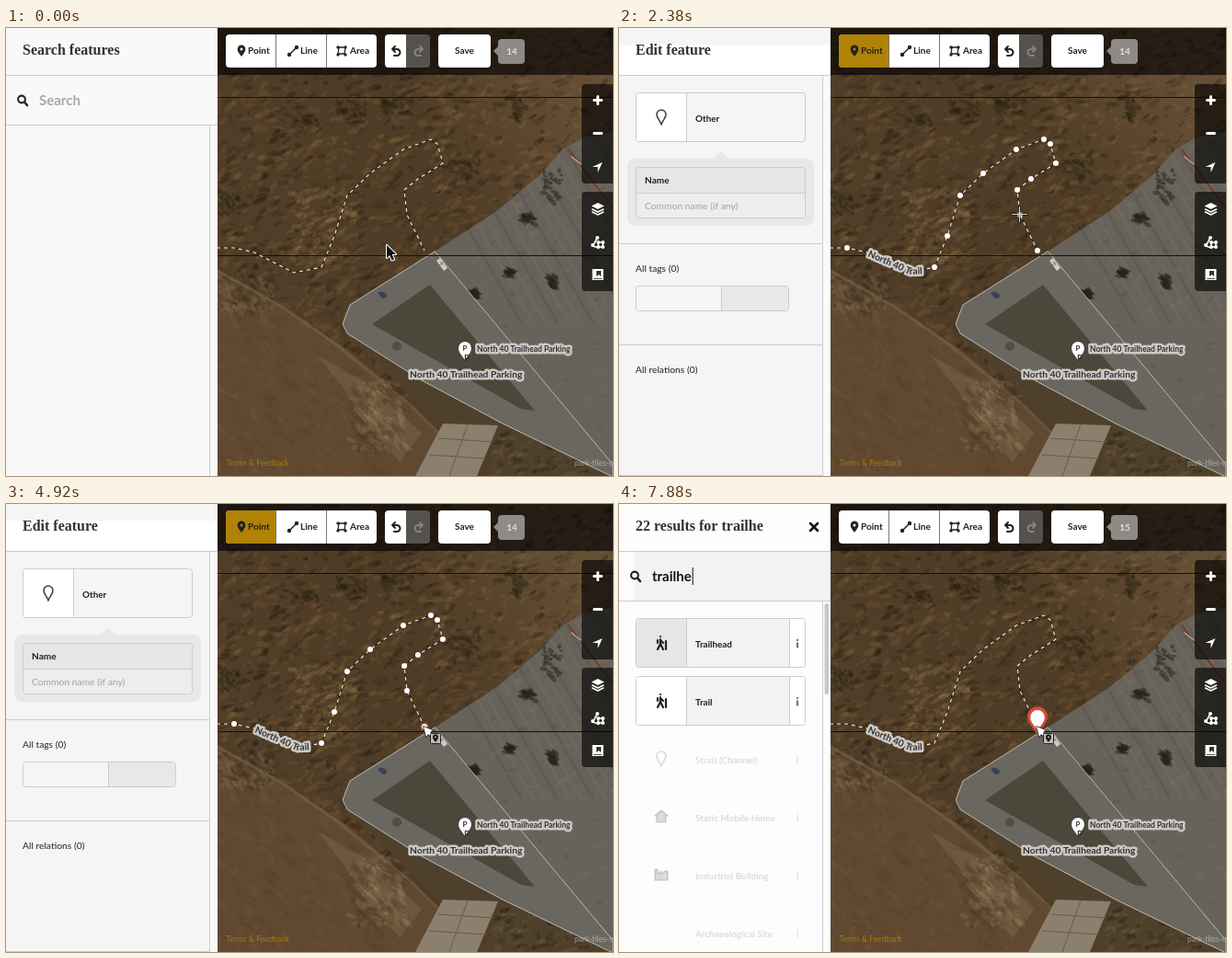
An HTML page with a canvas that plays this animation: 660 by 487 pixels, repeating every 8000 ms.

```html
<!DOCTYPE html>
<html lang="en">
<head>
<meta charset="utf-8">
<title>Map editor: adding a point</title>
<style>
html, body { margin: 0; width: 660px; height: 487px; overflow: hidden; background: #fafafa; }
canvas { display: block; }
</style>
</head>
<body>
<canvas id="stage" width="660" height="487"></canvas>
<script>
const LOOP = 8000, TICK = 148.7;
const stage = document.getElementById('stage').getContext('2d');
let ctx = stage;

// Drawing helpers
const lato = (size, weight = 700) => `${weight} ${size}px Lato, sans-serif`;
const SERIF = 'bold 16px "Liberation Serif", serif';

function text(str, x, y, font = lato(10.1), color = '#222', align = 'left') {
  ctx.font = font;
  ctx.fillStyle = color;
  ctx.textAlign = align;
  ctx.fillText(str, x, y);
}
function rect(x, y, w, h, fill) {
  ctx.fillStyle = fill;
  ctx.fillRect(x, y, w, h);
}
function box(x, y, w, h, r, fill, stroke) {
  ctx.beginPath();
  ctx.roundRect(x, y, w, h, r);
  if (fill) { ctx.fillStyle = fill; ctx.fill(); }
  if (stroke) { ctx.strokeStyle = stroke; ctx.lineWidth = 1; ctx.stroke(); }
}
function shape(d, x, y, { fill, stroke, width = 1, scale = 1, flip = 1 }) {
  const path = new Path2D(d);
  ctx.save();
  ctx.translate(x, y);
  ctx.scale(scale * flip, scale);
  ctx.lineCap = ctx.lineJoin = 'round';
  ctx.lineWidth = width;
  if (stroke) { ctx.strokeStyle = stroke; ctx.stroke(path); }
  if (fill) { ctx.fillStyle = fill; ctx.fill(path); }
  ctx.restore();
}
function dot(x, y, r, fill) {
  ctx.beginPath();
  ctx.arc(x, y, r, 0, 7);
  ctx.fillStyle = fill;
  ctx.fill();
}
function halo(str, x, y, font) {
  ctx.font = font;
  ctx.textAlign = 'left';
  ctx.lineJoin = 'round';
  ctx.lineWidth = 5;
  ctx.strokeStyle = '#cbc9c4';
  ctx.strokeText(str, x, y);
}

const PIN = 'M0 0C-3-5-7-8-7-13A7 7 0 0 1 7-13C7-8 3-5 0 0Z';
const ARROW = 'M0 0V14L3.2 11L5.6 16.5L8 15.5L5.7 10H10Z';
const HAND = 'M-2 8V0A1.6 1.6 0 0 1 1.2 0V5L8 6.5Q10 7 9.5 10L8 16H0L-5 9Q-5 6-2 8Z';
const HIKER = 'M-1-7h.1M-1-4v5l-3 6M-1 1l3 6M-1-3l3 3M5-2v9M-4-3v3';
const ICONS = {
  'Waste Basket': 'M3-7h.1M3-4v11M5-3v4M3-3l-4 2M-7 1l1 6h3l1-6z',
  'Picnic Area': 'M-5-4h10M-7 0h14M-2-4l-4 9M2-4l4 9',
  'Restroom': 'M-5-6h.1M-5-3v9M-3-3v4M-7-3v4M5-6h.1M5-3v9M3 1l1-4h2l1 4M0-6v12',
  'Campground': 'M-6 6L1-6M-1-6L6 6M-7 6h4l3-5l3 5h4',
  'Information': 'M-7 0a7 7 0 1 0 14 0a7 7 0 1 0-14 0',
  'Trailhead': HIKER,
  'Trail': HIKER,
  'Strait (Channel)': 'M0 8C-1 4-5 1-5-3A5 5 0 0 1 5-3C5 1 1 4 0 8Z',
  'Static Mobile Home': 'M-7-1L0-7L7-1H5V6H-5V-1Z',
  'Industrial Building': 'M-7 6V-6H-4V-1L0-4V-1L4-4H7V6Z'
};
const SOLID = ['Static Mobile Home', 'Industrial Building'];
const PRESETS = ['Waste Basket', 'Picnic Area', 'Restroom', 'Campground', 'Parking', 'Information'];
const RESULTS = ['Trailhead', 'Trail', 'Strait (Channel)', 'Static Mobile Home', 'Industrial Building', 'Archaeological Site'];

const TRAIL = [[229, 239], [248, 239], [270, 244], [313, 266], [343, 260], [357, 226], [371, 182],
  [396, 158], [432, 132], [462, 121], [469, 126], [475, 147], [448, 164], [433, 176], [436, 203], [455, 242]];
const trailPath = 'M' + TRAIL.join('L');

// Aerial backdrop in simple tones, painted once
function paintGround() {
  let seed = 40;
  const rnd = () => (seed = seed * 16807 % 2147483647) / 2147483647;
  const speckle = (count, x, y, w, h, size, colors, tilt = -0.9) => {
    for (let i = 0; i < count; i++) {
      ctx.fillStyle = colors[i % colors.length];
      ctx.beginPath();
      ctx.ellipse(x + rnd() * w, y + rnd() * h, 1 + rnd() * size, 1 + rnd() * size / 3, rnd() + tilt, 0, 7);
      ctx.fill();
    }
  };
  const bush = (x, y, w, h, color) => speckle(26, x - w, y - h, 2 * w, 2 * h, 5, [color], 0);

  const base = ctx.createLinearGradient(230, 230, 600, 40);
  base.addColorStop(0, '#513e28');
  base.addColorStop(0.6, '#4f3c26');
  base.addColorStop(1, '#644e34');
  rect(230, 0, 430, 487, base);
  speckle(2200, 230, 0, 430, 400, 7, ['#140e0640', '#a07d4e2c', '#2a1f1238', '#8a6a4230']);
  speckle(150, 310, 175, 70, 80, 6, ['#a07d4e30']);
  [[375, 88, 18, 9], [320, 100, 20, 8], [425, 85, 15, 8], [500, 152, 18, 8], [245, 190, 14, 12], [556, 90, 5, 14]]
    .forEach(b => bush(...b, '#1c1b0e48'));

  shape('M230 262L270 285L330 322L372 350L410 382L442 412L472 445L450 487H230Z', 0, 0, { fill: '#604930' });
  speckle(260, 230, 300, 200, 187, 10, ['#4230201c', '#86694620'], 0.2);
  speckle(220, 230, 270, 60, 40, 7, ['#84705038', '#33271830'], 0.2);
  shape('M230 264L300 303L360 345L440 410L470 440', 0, 0, { stroke: '#77654a90', width: 3 });
  shape('M338 355L390 385L452 440L428 472Z', 0, 0, { fill: '#7d694e70' });
  speckle(160, 375, 385, 65, 75, 8, ['#a08c6a38', '#40311f30'], 0.3);
  shape('M371 332L452 383L540 430L660 488H520L535 432L470 430Z', 0, 0, { fill: '#4f402b' });
  speckle(140, 530, 440, 110, 47, 6, ['#20180e38', '#86704c28']);
  shape('M475 430L535 432L512 487H445Z', 0, 0, { fill: '#8b806d' });
  shape('M470 446L530 450M460 464L521 468M502 431L482 487', 0, 0, { stroke: '#665b49', width: 1 });

  ctx.save();
  ctx.clip(new Path2D('M466 243L535 198L580 160L605 132L628 119L660 112V475Z'));
  rect(460, 100, 200, 387, '#67635a');
  for (let i = 0; i < 26; i++)
    shape('M0 0L130 230', 430 + i * 13, 90, { stroke: i % 3 ? '#85817428' : '#4d494048', width: 3 });
  speckle(120, 470, 110, 190, 350, 6, ['#3d392c28', '#8a857724']);
  [[524, 184, 8, 4], [567, 208, 9, 6], [594, 172, 10, 18], [594, 276, 4, 7], [548, 266, 4, 5], [508, 290, 5, 6]]
    .forEach(b => bush(...b, '#26231680'));
  ctx.restore();
  shape('M612 132L660 196', 0, 0, { stroke: '#7c3222', width: 1.5 });
  shape('M615 140L625 148', 0, 0, { stroke: '#c0aaa0', width: 1.2 });

  const lot = 'M466 243L374 301L366 322L371 332L452 383L540 430L660 488V475Z';
  const middle = 'M398 322L461 279L575 416L560 414Z';
  shape(lot, 0, 0, { fill: '#4e4b42' });
  shape(middle, 0, 0, { fill: '#4b473b' });
  ctx.fillStyle = '#ffffff28';
  ctx.fill(new Path2D(lot + middle), 'evenodd');
  shape(lot, 0, 0, { stroke: '#bdbab2', width: 1 });
  shape('M-5-2Q0-6 5 0Q6 4 0 4Z', 409, 290, { fill: '#394455' });
  dot(425, 346, 5, '#504e47');
  shape('M-6-4L-2-7L6 4L2 7Z', 474, 257, { fill: '#cfcdc6' });
  shape('M-2-3l3 4M1-2l-4 3', 474, 257, { stroke: '#77746c', width: 1 });
  rect(230, 75, 430, 1, '#15110a');
  rect(230, 247, 430, 1, '#15110a');
}
const ground = document.createElement('canvas');
ground.width = 660;
ground.height = 487;
ctx = ground.getContext('2d');
paintGround();
ctx = stage;

function trailLabel() {
  const font = lato(10.2), label = 'North 40 Trail';
  for (const pass of ['halo', 'ink']) {
    let x = 270, y = 248, run = 0;
    for (const ch of label) {
      ctx.font = font;
      const w = ctx.measureText(ch).width, angle = run < 47 ? 0.41 : -0.04;
      ctx.save();
      ctx.translate(x, y);
      ctx.rotate(angle);
      pass === 'halo' ? halo(ch, 0, 0, font) : text(ch, 0, 0, font, '#333');
      ctx.restore();
      x += w * Math.cos(angle);
      y += w * Math.sin(angle);
      run += w;
    }
  }
}

function drawMap(tick, hover) {
  ctx.drawImage(ground, 0, 0);
  ctx.save();
  ctx.beginPath();
  ctx.rect(230, 0, 430, 487);
  ctx.clip();
  if (hover === 'line') shape(trailPath, 0, 0, { stroke: '#d5523490', width: 14 });
  shape(trailPath, 0, 0, { stroke: '#2a2015b0', width: 1.5 });
  ctx.setLineDash([4, 4]);
  ctx.lineCap = 'butt';
  ctx.lineWidth = 1.1;
  ctx.strokeStyle = '#f4f1ea';
  ctx.stroke(new Path2D(trailPath));
  ctx.setLineDash([]);
  if (hover) {
    if (tick >= 24) dot(455, 242, 5, '#d5523490');
    TRAIL.forEach(([x, y], i) => { if (i && i !== 2 && i !== 3) dot(x, y, 3, '#fff'); });
  }
  if (tick >= 2) trailLabel();

  shape(PIN, 499, 361, { fill: '#fff', stroke: '#0006', width: 1 });
  text('P', 499, 351, lato(8), '#333', 'center');
  text('P', 501, 362, lato(10), '#333', 'center');
  const name = 'North 40 Trailhead Parking';
  for (const [x, y, size] of [[512, 352, 8.5], [439, 380, 10.25]]) {
    halo(name, x, y, lato(size));
    text(name, x, y, lato(size), '#333');
  }
  if (tick >= 34) {
    shape(PIN, 455, 246, { stroke: '#d94c36', width: 5, scale: 1.15 });
    shape(PIN, 455, 246, { fill: '#fff', scale: 1.1 });
  }
  text('Terms & Feedback', 239.5, 476, lato(8.5, 400), '#a87c08');
  text('park-tiles-o', 618, 476, lato(8.5, 400), '#ffffff70');
  ctx.restore();
}

function drawControls(tick) {
  rect(230, 0, 430, 51, '#000000a0');
  box(239, 7, 164, 36, 4, '#fff');
  const adding = tick >= 10 && tick < 34;
  if (adding) box(239, 7, 54, 36, [4, 0, 0, 4], '#b08205');
  rect(293, 7, 1, 36, '#777');
  rect(348, 7, 1, 36, '#777');
  shape(PIN, 256, 31, { fill: '#222', scale: 0.62 });
  dot(256, 23, 1.5, adding ? '#b08205' : '#fff');
  text('Point', 263, 28);
  shape('M-4 4L4-4', 312, 25, { stroke: '#222', width: 1.5 });
  dot(308, 29, 2.2, '#222');
  dot(316, 21, 2.2, '#222');
  text('Line', 320, 28);
  shape('M-3-4H4L3 3H-4Z', 365, 25, { stroke: '#222', width: 1.3 });
  [[361, 21], [369, 21], [361, 29], [369, 29]].forEach(([x, y]) => dot(x, y, 1.7, '#222'));
  text('Area', 374, 28);
  box(412, 7, 23, 36, [4, 0, 0, 4], '#fff');
  box(435, 7, 26, 36, [0, 4, 4, 0], '#55524d');
  const undo = 'M-4-2H1a3 3 0 0 1 0 7H-2M-1-5l-3 3l3 3';
  shape(undo, 424, 25, { stroke: '#222', width: 2 });
  shape(undo, 449, 25, { stroke: '#85827d', width: 2, flip: -1 });
  box(470, 7, 57, 36, 4, '#fff');
  text('Save', 498.5, 28, undefined, undefined, 'center');
  box(535, 12, 29, 27, 4, '#8d8a87');
  shape('M0-5L-5 0L0 5Z', 535, 25, { fill: '#8d8a87' });
  text(tick >= 34 ? '15' : '14', 550, 29, lato(10), '#e2e0dd', 'center');

  box(626, 61, 34, 108, [4, 0, 0, 4], '#000000a0');
  box(626, 178, 34, 108, [4, 0, 0, 4], '#000000a0');
  const white = { fill: '#fff' }, pen = { stroke: '#fff', width: 1.6 };
  shape('M-4 0H4M0-4V4', 643.5, 78.5, { stroke: '#fff', width: 3 });
  shape('M-4 0H4', 643.5, 114.5, { stroke: '#fff', width: 3 });
  shape('M5-5L-6 0H0V6Z', 643.5, 151, white);
  shape('M0-6L7-2.5L0 1L-7-2.5Z', 643.5, 196, white);
  shape('M-6 1L0 4L6 1M-6 4L0 7L6 4', 643.5, 196, pen);
  shape('M-5 4L0-5M-5 4L1 6M1 0H6V5H1Z', 643, 233, pen);
  [[643, 228], [638, 236], [644, 233], [649, 233], [644, 238], [649, 238]].forEach(([x, y]) => dot(x, y, 2, '#fff'));
  shape('M-6-6H6V6H-6Z', 643.5, 268, white);
  shape('M-1-4V2L1.5 0L4 2V-4Z', 643, 268, { fill: '#333' });
  shape('M-4 4.5H4', 643.5, 268, { stroke: '#555', width: 1 });
}

function card(name, y, { bg = '#fafafa', iconBg = '#fff', alpha = 1, info = true }) {
  ctx.save();
  ctx.globalAlpha = alpha;
  const faded = alpha < 0.3;
  box(18.5, y + 0.5, 184, 53, 3, faded ? null : bg, faded ? '#eee' : '#ccc');
  if (!faded) {
    box(19, y + 1, 54, 52, [3, 0, 0, 3], iconBg);
    rect(73, y + 1, 1, 52, '#ccc');
    if (info) {
      box(186, y + 1, 16, 52, [0, 3, 3, 0], '#fff');
      rect(185, y + 1, 1, 52, '#ccc');
    }
  }
  if (name === 'Parking') text('P', 45.5, y + 35, lato(20, 900), '#111', 'center');
  else if (ICONS[name])
    shape(ICONS[name], 46, y + 27, { stroke: '#222', width: ICONS[name] === HIKER ? 2.2 : 1.7, fill: SOLID.includes(name) && '#222' });
  if (name === 'Information') text('?', 46, y + 31, lato(11), '#222', 'center');
  if (name === 'Other') shape(ICONS['Strait (Channel)'], 46, y + 27, { stroke: '#444', width: 1.6 });
  text(name, 83, y + 32, lato(9.9));
  if (info) shape('M0-4h.1M0-.5v4', 194, y + 28, { stroke: '#777', width: 2.3 });
  ctx.restore();
}

function searchRow(query, caret) {
  rect(0, 51, 230, 1, '#ccc');
  rect(0, 105, 230, 1, '#ccc');
  if (query) rect(17, 52, 213, 53, '#f2f2f2');
  dot(17, 77.5, 4.9, '#222');
  dot(17, 77.5, 2.8, query ? '#f6f6f6' : '#fafafa');
  shape('M20.5 81L23 84', 0, 0, { stroke: '#222', width: 2.6 });
  text(query || 'Search', 36, 84, lato(15), query ? '#111' : '#a8a8a8');
  if (caret) rect(query ? 37 + ctx.measureText(query).width : 36, 69, 1, 19, '#111');
  rect(221, 106, 1, 381, '#ccc');
}

function drawEditor(hover) {
  const shift = hover === 'line' ? 9 : 0;
  rect(0, 0, 230, 487, '#f5f5f5');
  rect(0, 18, 230, 33, '#fff');
  rect(222, 52, 8, 435, '#fafafa');
  rect(0, 51, 230, 1, '#ccc');
  rect(221, 52, 1, 435, '#ccc');
  rect(0, 486, 222, 1, '#ccc');
  text('Edit feature', 18, 29, SERIF, '#333');
  card('Other', 70, { bg: '#f5f5f5', info: false });
  box(9, 142, 203, 73 + shift, 8, '#e8e8e8');
  shape('M-9 0L0-8L9 0Z', 111, 142.5, { fill: '#e8e8e8' });
  box(18.5, 151.5, 184, 55, 3, '#ededed', '#ccc');
  box(19, 152, 183, 27, [3, 3, 0, 0], '#e6e6e6');
  rect(19, 179, 183, 1, '#ccc');
  text('Name', 28, 169);
  text('Common name (if any)', 28, 197, lato(10.3, 400), '#a0a0a0');
  ctx.save();
  ctx.translate(0, shift);
  rect(0, 234, 221, 1, '#ccc');
  text('All tags (0)', 18, 265, lato(10.3, 400), '#222');
  box(18.5, 280.5, 166, 27, 3, '#f5f5f5', '#ccc');
  box(112, 281, 72, 26, [0, 3, 3, 0], '#e8e8e8');
  rect(111, 281, 1, 26, '#ccc');
  rect(0, 344, 221, 1, '#ccc');
  text('All relations (0)', 18, 375, lato(10.3, 400), '#222');
  ctx.restore();
}

function drawChooser(tick) {
  const typed = [[53, 7], [52, 6], [47, 5], [46, 4], [45, 2], [44, 1]].find(([at]) => tick >= at);
  const query = 'trailhead'.slice(0, typed ? typed[1] : 0);
  rect(0, 0, 230, 487, '#fdfdfd');
  const count = query.length > 5 ? 22 : 50;
  text(query ? `${count} results for ${query}` : 'Select feature type', 18, 29, SERIF, '#333');
  shape('M-4-4L4 4M4-4L-4 4', 212, 25, { stroke: '#111', width: 2.6 });
  searchRow(query, query || (tick >= 35 && tick < 39) || tick >= 42);
  const leaving = tick >= 53 ? 0.15 : tick >= 52 ? 0.5 : 1;
  (query ? RESULTS : PRESETS).forEach((name, i) => card(name, 124 + 63 * i, !query ? {} :
    { bg: '#f2f2f2', iconBg: i ? '#fff' : '#e6e6e6', alpha: i > 1 ? leaving : 1 }));
  box(223.5, 108, 4.5, query ? 99 : 156, 2, '#c8c8c8');
}

function drawSidebar(tick, hover) {
  if (tick >= 34) return drawChooser(tick);
  if (hover) return drawEditor(hover);
  rect(0, 0, 230, 487, '#f9f9f9');
  text('Search features', 18, 29, SERIF, '#333');
  searchRow('', false);
}

// Pointer route: [tick, x, y]
const ROUTE = [[1, 414, 236], [5, 269, 42], [6, 265, 22], [10, 265, 22], [12, 357, 171], [16, 436, 203],
  [19, 451, 240], [24, 453, 241], [27, 453, 241], [29, 454, 242], [54, 454, 242]];

function drawPointer(tick) {
  const next = Math.max(1, ROUTE.findIndex(([at]) => at >= tick));
  const [t0, x0, y0] = ROUTE[next - 1], [t1, x1, y1] = ROUTE[next];
  const k = Math.max(0, (tick - t0) / (t1 - t0));
  const x = Math.round(x0 + (x1 - x0) * k), y = Math.round(y0 + (y1 - y0) * k);
  if (tick < 5) shape(ARROW, x, y, { fill: '#111', stroke: '#fff', width: 2 });
  else if (tick < 11) shape(HAND, x, y, { fill: '#fff', stroke: '#111', width: 2, scale: 0.85 });
  else if (tick < 33) {
    const cross = 'M-8 0H8M0-8V8';
    shape(cross, x - 0.5, y - 0.5, { stroke: '#0007', width: 3 });
    shape(cross, x - 0.5, y - 0.5, { stroke: '#e6dac4', width: 1 });
  } else {
    shape('M0 0L3 11L5 8L9 12L11 10L7 6L10 4Z', x, y, { fill: '#fff', stroke: '#222', width: 1.6 });
    box(461.5, 249.5, 11, 11, 1, '#bdbab4', '#222');
    shape(PIN, 467, 259, { fill: '#111', scale: 0.42 });
    dot(467, 253.5, 1, '#ccc');
  }
}

const start = performance.now();
function frame() {
  const tick = Math.floor(((performance.now() - start) % LOOP + 13) / TICK);
  const hover = tick >= 34 ? null
    : tick === 16 || tick >= 24 ? 'vertex'
    : tick >= 18 ? 'line' : null;
  drawMap(tick, hover);
  drawControls(tick);
  drawSidebar(tick, hover);
  drawPointer(tick);
  requestAnimationFrame(frame);
}
frame();
</script>
</body>
</html>
```
